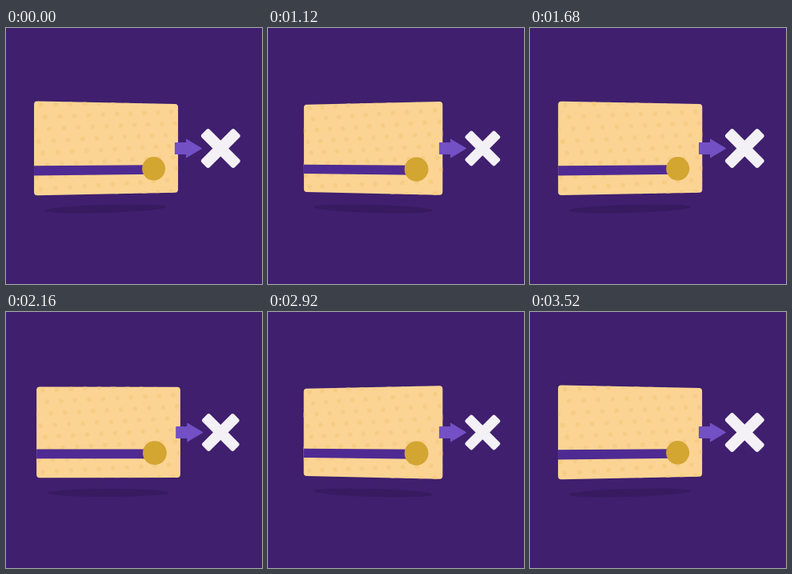
Animation of 320x320 px, one loop 3.56 s. Source, as an HTML page:

```html
<!DOCTYPE html>
<html lang="en">
<head>
<meta charset="utf-8">
<title>Card and cross</title>
<style>
  html, body { margin: 0; width: 100%; height: 100%; overflow: hidden; background: #3f1f6e; }
  svg { position: absolute; left: 0; top: 0; display: block; }
</style>
</head>
<body>
<svg width="320" height="320" viewBox="0 0 320 320">
  <defs><clipPath id="clip"><path id="edge"/></clipPath></defs>
  <ellipse id="shadow" ry="5" fill="#371a60"/>
  <path id="card" fill="#fbd494"/>
  <g id="dots" fill="#f7cd85" clip-path="url(#clip)"/>
  <path id="stripe" fill="#4f2a93"/>
  <ellipse id="mark" fill="#d3a531"/>
  <path id="arrow" d="M211.5 143.5H225.5V139.2L244.3 150.5L225.5 161.8V157.5H211.5Z"
    fill="#7350c4" stroke="#7350c4" stroke-width="1.2" stroke-linejoin="round"/>
  <g id="cross" fill="#f3f1f6">
    <rect x="-29.2" y="-7" width="58.4" height="14" rx="3" transform="rotate(45)"/>
    <rect x="-29.2" y="-7" width="58.4" height="14" rx="3" transform="rotate(-45)"/>
  </g>
</svg>
<script>
const LOOP = 3560, HALF = LOOP / 4, START = 15;
const DEPTH = 480, EYE = { x: 160, y: 150.4 };
const W = 90.25, H = 57, R = 4; // half width, half height and corner of the card

const el = id => document.getElementById(id);
const set = (node, attrs) => { for (const k in attrs) node.setAttribute(k, attrs[k]); };

// Slightly tilted rows of dots, in card coordinates
const dots = [];
for (let row = 0; row < 10; row++) {
  for (let col = -2; col < 12; col++) {
    const x = 8 + col * 17.6 + (row * 5) % 17.6 - W;
    const y = 5 + row * 14.6 - (x + W) * 0.055 - H;
    if (Math.abs(x) > W + 4 || Math.abs(y) > H + 4) continue;
    const node = document.createElementNS('http://www.w3.org/2000/svg', 'ellipse');
    el('dots').append(node);
    dots.push({ node, x, y });
  }
}

// Bezier ease (.5, 0, .35, 1)
function ease(u) {
  let lo = 0, hi = 1;
  for (let i = 0; i < 24; i++) {
    const s = (lo + hi) / 2, r = 1 - s;
    const x = 1.5 * r * r * s + 1.05 * r * s * s + s * s * s;
    if (x < u) lo = s; else hi = s;
  }
  return lo * lo * (3 - 2 * lo);
}

function drawCard(p) {
  const a = (10 - 22 * p) * Math.PI / 180;
  const cos = Math.cos(a), sin = Math.sin(a);
  const size = 1 - 0.012 * p, shift = -32 + 0.6 * p;

  const zoom = x => DEPTH / (DEPTH + x * size * sin);
  const at = (x, y) => {
    const k = zoom(x);
    return [EYE.x + (shift + x * size * cos) * k, EYE.y + y * size * k];
  };
  const pt = (x, y) => at(x, y).map(v => v.toFixed(2)).join(' ');
  const oval = (node, x, y, r) => {
    const [cx, cy] = at(x, y), ry = r * size * zoom(x);
    set(node, { cx, cy, rx: ry * cos, ry });
  };

  const outline = `M${pt(R - W, -H)}L${pt(W - R, -H)}Q${pt(W, -H)} ${pt(W, R - H)}` +
    `L${pt(W, H - R)}Q${pt(W, H)} ${pt(W - R, H)}` +
    `L${pt(R - W, H)}Q${pt(-W, H)} ${pt(-W, H - R)}` +
    `L${pt(-W, R - H)}Q${pt(-W, -H)} ${pt(R - W, -H)}Z`;
  set(el('card'), { d: outline });
  set(el('edge'), { d: outline });
  set(el('stripe'), { d: `M${pt(-W, 21.2)}L${pt(58, 21.2)}L${pt(58, 33)}L${pt(-W, 33)}Z` });
  oval(el('mark'), 58, 25.9, 15);
  for (const dot of dots) oval(dot.node, dot.x, dot.y, 3);
}

function draw(ms) {
  const t = (ms - START + LOOP) % (2 * HALF);
  const p = ease(1 - Math.abs(1 - t / HALF));
  drawCard(p);
  set(el('shadow'), {
    rx: 76 - 1.3 * p,
    transform: `translate(${124.5 + 7.4 * p} 226) rotate(${-1.8 + 3.8 * p})`
  });
  set(el('arrow'), { transform: `translate(${3.2 * p} 0)` });
  set(el('cross'), { transform: `translate(268.3 150.5) scale(${1 - 0.11 * p})` });
}

draw(0);
let begin;
function tick(now) {
  if (begin === undefined) begin = now;
  draw((now - begin) % LOOP);
  requestAnimationFrame(tick);
}
requestAnimationFrame(tick);
</script>
</body>
</html>
```
